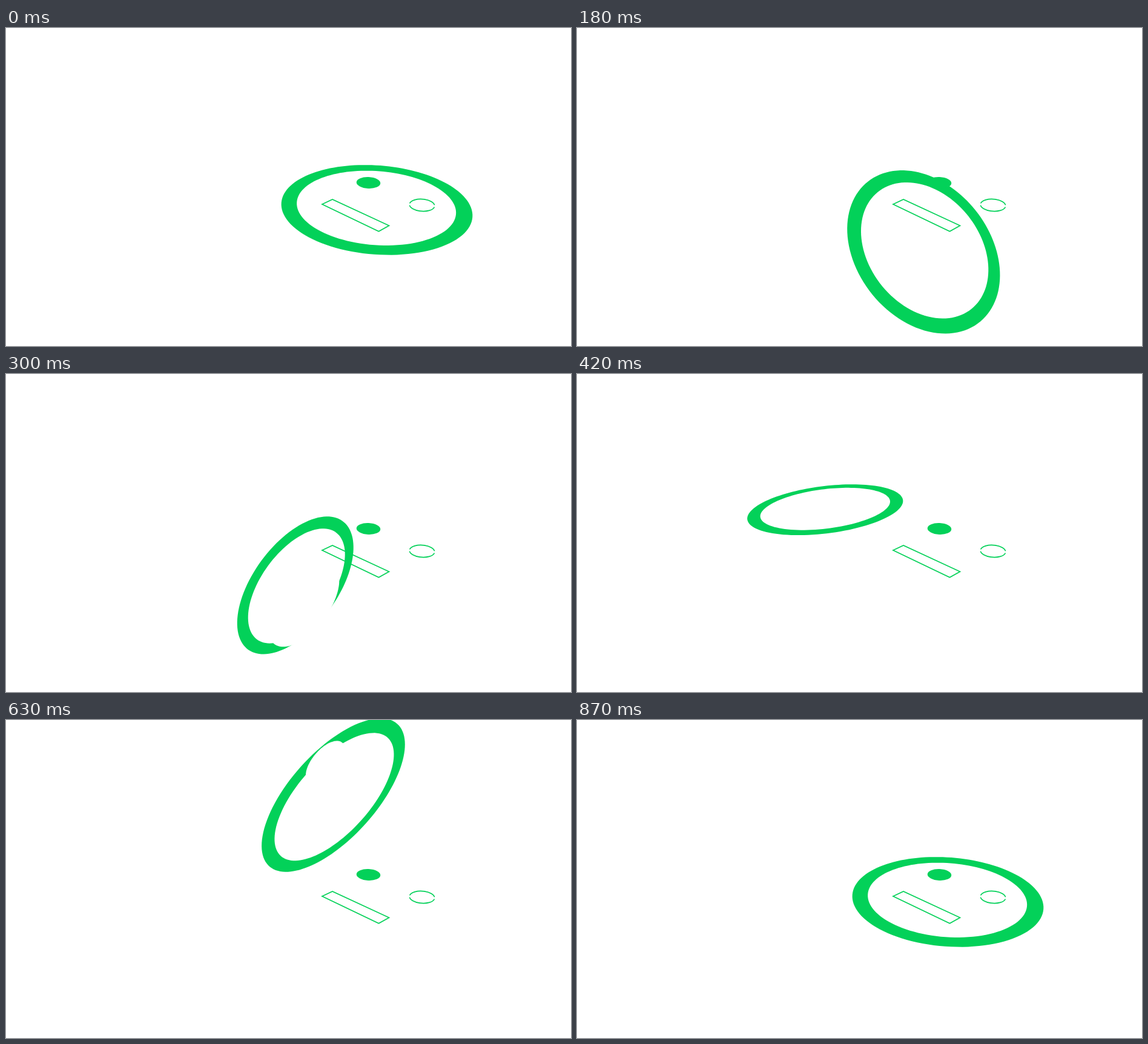
An HTML page with a canvas for the animation above (0.9 s loop, 933 px wide and 525 px high).

```html
<!DOCTYPE html>
<html lang="en">
<head>
<meta charset="utf-8">
<title>Flipping ring</title>
<style>
  html, body { margin: 0; width: 100%; height: 100%; overflow: hidden; background: #fff; }
  canvas { display: block; width: 933px; height: 525px; }
</style>
</head>
<body>
<canvas id="stage" width="933" height="525"></canvas>
<script>
const ctx = document.getElementById('stage').getContext('2d');
const GREEN = '#03d159', WHITE = '#fff';
const LOOP = 900, STEP = 30;
const RAD = Math.PI / 180, TAU = Math.PI * 2;

// Ring in world units; it turns about a hinge parallel to the y axis.
const OUTER = 1.73, INNER = 1.445;
const HINGE = { x: -0.505, y: 1.505 };

// Perspective camera: world point to stage pixel.
function project(x, y, z) {
  const right = 0.6859 * x + 0.7277 * y - 0.0108 * z - 0.338;
  const up = -0.3240 * x + 0.3055 * y + 0.8954 * z - 0.3727;
  const depth = 11.251 - 0.6516 * x + 0.6142 * y - 0.4453 * z;
  const scale = 1020.5 / depth;
  return [466.5 + right * scale, 262.5 - up * scale];
}

// Circle in the ring's plane; (u, w) is its offset from the ring's centre.
function circle(angle, radius, u = 0, w = 0) {
  const c = Math.cos(angle), s = Math.sin(angle), n = 120;
  for (let i = 0; i < n; i++) {
    const a = i / n * TAU;
    const d = OUTER + u + radius * Math.cos(a);
    const p = project(HINGE.x + d * c, HINGE.y + w + radius * Math.sin(a), -d * s);
    if (i) ctx.lineTo(...p); else ctx.moveTo(...p);
  }
  ctx.closePath();
}

// Linear interpolation through [x, y] points, flat outside them.
function ramp(x, points) {
  for (let i = 1; i < points.length; i++) {
    const [x0, y0] = points[i - 1], [x1, y1] = points[i];
    if (x <= x1) return y0 + (y1 - y0) * Math.max(0, (x - x0) / (x1 - x0));
  }
  return points[points.length - 1][1];
}

// Blown-out highlight that eats into the ring from its inner edge.
function glare(deg) {
  const early = deg < 180;
  const size = early
    ? ramp(deg, [[70, 0], [99, 1], [117, 1], [130, 0]])
    : ramp(deg, [[292, 0], [335, 1], [342, 1], [355, 0]]);
  if (size <= 0) return;
  const dir = RAD * (early ? 24 : ramp(deg, [[294, -36], [342, -28]]));
  const shift = 1.3 - 0.58 * size;
  ctx.fillStyle = WHITE;
  ctx.beginPath();
  circle(deg * RAD, 0.39 + 0.72 * size, shift * Math.cos(dir), shift * Math.sin(dir));
  ctx.fill();
}

function drawRing(deg) {
  ctx.fillStyle = GREEN;
  ctx.beginPath();
  circle(deg * RAD, OUTER);
  circle(deg * RAD, INNER);
  ctx.fill('evenodd');
  glare(deg);
}

function drawFloor() {
  ctx.fillStyle = ctx.strokeStyle = GREEN;
  ctx.lineWidth = 1.7;

  ctx.beginPath();
  ctx.ellipse(598.5, 255.5, 19.8, 9.4, 3 * RAD, 0, TAU);
  ctx.fill();

  for (const start of [9, 189]) {
    ctx.beginPath();
    ctx.ellipse(687, 292.5, 20.8, 10, 4 * RAD, start * RAD, (start + 162) * RAD);
    ctx.stroke();
  }

  ctx.beginPath();
  ctx.moveTo(522, 291);
  ctx.lineTo(539, 283);
  ctx.lineTo(632.5, 326.3);
  ctx.lineTo(615.5, 335.7);
  ctx.closePath();
  ctx.stroke();
}

function draw(now) {
  const step = Math.floor(now % LOOP / STEP);
  const t = Math.min(1, step / 28.9);
  ctx.fillStyle = WHITE;
  ctx.fillRect(0, 0, 933, 525);
  drawRing(360 * t * t * (3 - 2 * t));
  drawFloor();
}

let begin;
function tick(now) {
  begin ??= now;
  draw(now - begin);
  requestAnimationFrame(tick);
}
draw(0);
requestAnimationFrame(tick);
</script>
</body>
</html>
```
